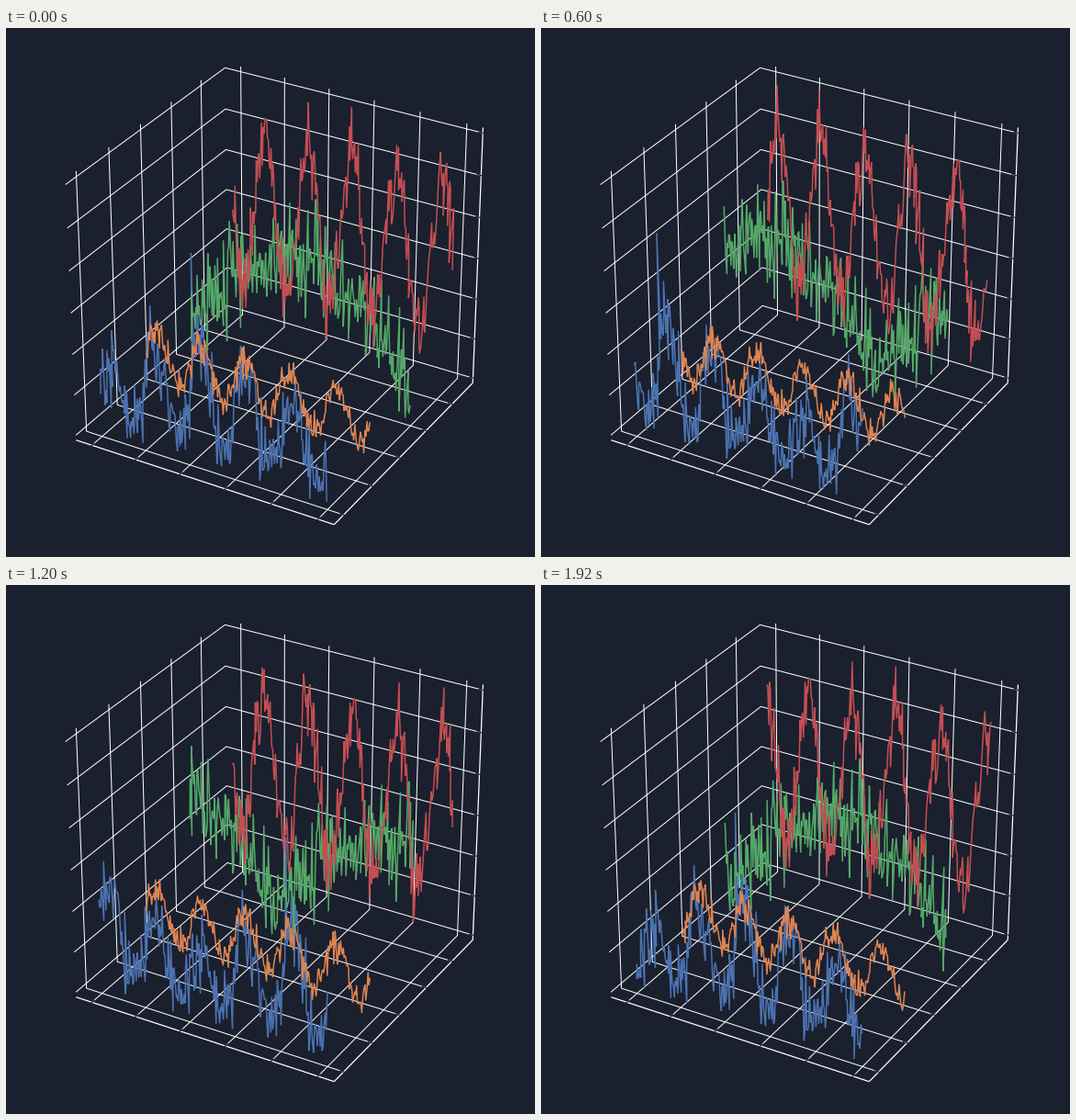
Recreate the animation shown at these times as a matplotlib script. Size 576x576 px, loop 2.04 s.

```python
import numpy as np
import matplotlib.pyplot as plt
from matplotlib.animation import FuncAnimation
from matplotlib.collections import LineCollection

SIZE, DPI = 576, 72
FRAMES, INTERVAL = 17, 120
N, STEP = 250, 15              # samples per line, samples scrolled per frame
BG, GRID, TICK = "#1a202e", "white", "#262626"
BLUE, ORANGE, GREEN, RED = "#4c72b0", "#dd8452", "#55a868", "#c44e52"

# Camera: unit cube seen from elevation 30, azimuth -60, distance 10
ELEV, AZIM, DIST = np.radians(30), np.radians(-60), 10
EYE = np.array([np.cos(ELEV) * np.cos(AZIM),
                np.cos(ELEV) * np.sin(AZIM),
                np.sin(ELEV)])
RIGHT = np.array([-np.sin(AZIM), np.cos(AZIM), 0])
UP = np.cross(EYE, RIGHT)

EDGE = 0.5 + 1 / 48            # half side of the padded box
SPAN = 0.5 / 1.1               # half extent of the data


def project(points):
    p = np.asarray(points, float)
    depth = DIST - p @ EYE
    return np.column_stack([p @ RIGHT / depth, p @ UP / depth])


def sample_x(index):
    return -SPAN + 2 * SPAN * index / (N - 1)


def draw_lines(ax, lines, color, width, zorder):
    ax.add_collection(LineCollection([project(l) for l in lines], colors=color,
                                     linewidths=width, zorder=zorder),
                      autolim=False)


def draw_box(ax):
    lo, hi = -EDGE, EDGE
    xs = sample_x(np.arange(0, N + 1, 50))
    ys = -SPAN + 2 * SPAN * np.arange(5) / 4.5
    zs = np.linspace(-0.5, 0.5, 7)
    axes = [[(lo, lo, lo), (hi, lo, lo)],
            [(hi, lo, lo), (hi, hi, lo)],
            [(hi, hi, lo), (hi, hi, hi)]]
    grid = [[(x, hi, hi), (x, hi, lo), (x, lo, lo)] for x in xs]
    grid += [[(lo, y, hi), (lo, y, lo), (hi, y, lo)] for y in ys]
    grid += [[(lo, lo, z), (lo, hi, z), (hi, hi, z)] for z in zs]
    inner, outer = 0.2 / 12, 0.1 / 12
    ticks = [[(x, lo - outer, lo), (x, lo + inner, lo)] for x in xs]
    ticks += [[(hi + outer, y, lo), (hi - inner, y, lo)] for y in ys]
    ticks += [[(hi + outer, hi, z), (hi - inner, hi, z)] for z in zs]
    draw_lines(ax, axes, GRID, 1.25, 1)
    draw_lines(ax, grid, GRID, 1.0, 1)
    draw_lines(ax, ticks, TICK, 1.25, 2)


def make_series():
    """Heights from 0 to 1: five waves, or one arch, plus noise."""
    rng = np.random.default_rng(12)
    noise = rng.normal(size=(4, N)).clip(-2.5, 2.5)
    u = np.arange(N) / N
    wave = np.sin(10 * np.pi * u)
    arch = np.sin(np.pi * u)

    blue = 0.08 + (0.08 + 0.12 * arch) * (1 + wave) + 0.085 * noise[0]
    blue[int(0.423 * N)] = 0.83          # lone spike
    orange = 0.165 + 0.1 * wave + 0.032 * noise[1]
    green = 0.12 + 0.43 * arch + 0.1 * noise[2]
    red = 0.5 - 0.33 * wave + 0.08 * noise[3]
    return np.abs([blue, orange, green, red])


fig = plt.figure(figsize=(SIZE / DPI, SIZE / DPI), dpi=DPI, facecolor=BG)
ax = fig.add_axes([0, 0, 1, 1])
ax.set_axis_off()
ax.set_xlim(-0.095, 0.09)
ax.set_ylim(-0.095, 0.09)
draw_box(ax)

series = make_series()
xs = sample_x(np.arange(N))
rows = np.linspace(-SPAN, SPAN, 4)
curves = [ax.plot([], [], color=c, lw=1.5, zorder=3 + i)[0]
          for i, c in enumerate([BLUE, ORANGE, GREEN, RED])]


def update(frame):
    for curve, values, y in zip(curves, series, rows):
        z = np.roll(values, -STEP * frame) - 0.5
        curve.set_data(*project(np.column_stack([xs, np.full(N, y), z])).T)
    return curves


anim = FuncAnimation(fig, update, frames=FRAMES, interval=INTERVAL,
                     init_func=lambda: update(0), repeat=True, repeat_delay=0)
plt.show()
```
